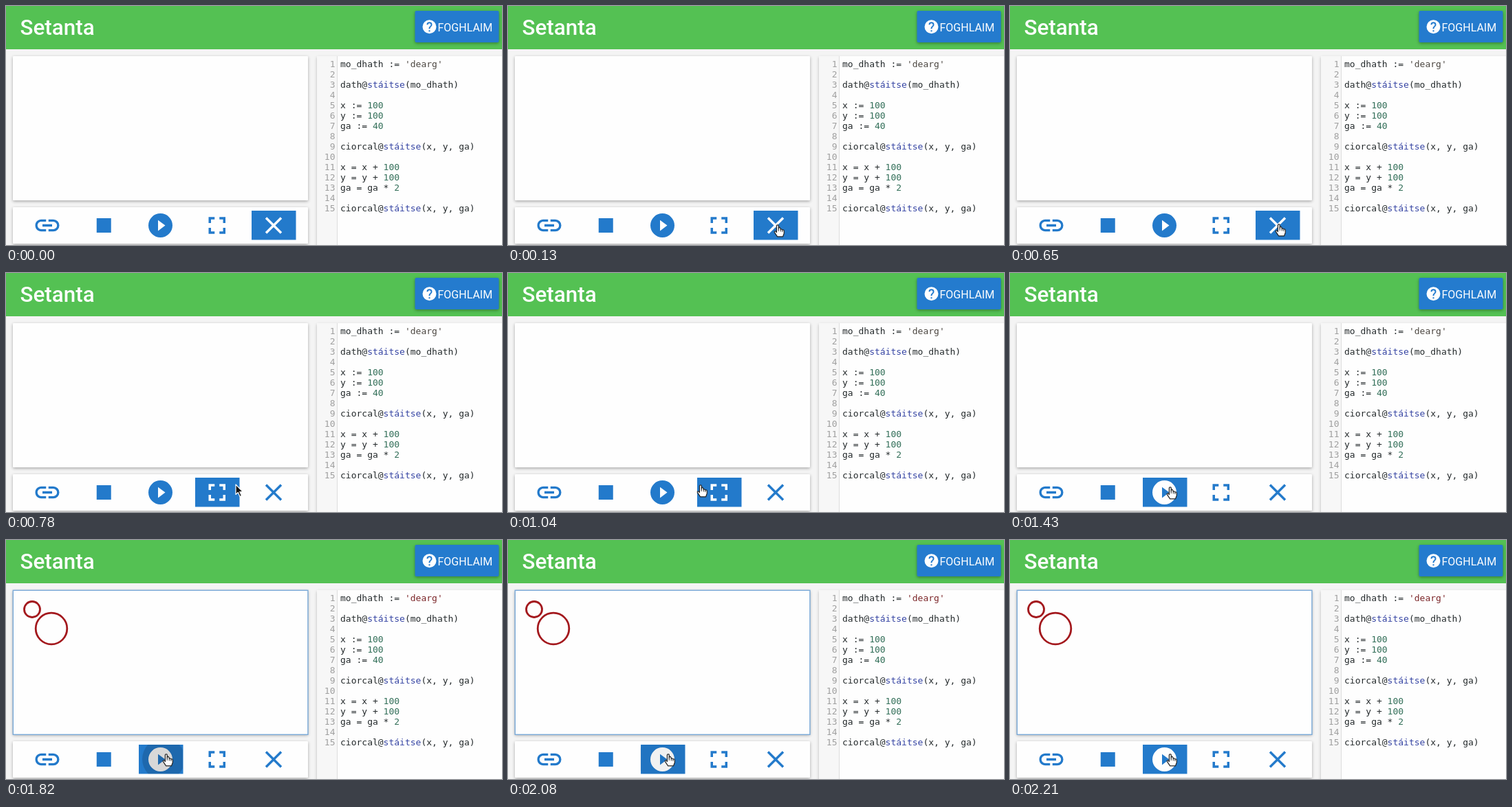
These frames come from a looping animation (721 by 348 pixels, 3.12 s). An HTML page with a canvas:

```html
<!DOCTYPE html>
<html lang="ga">
<head>
<meta charset="utf-8">
<title>Setanta</title>
<style>
  html, body { margin: 0; width: 721px; height: 348px; overflow: hidden; }
  canvas { display: block; }
</style>
</head>
<body>
<canvas id="stage" width="721" height="348"></canvas>
<script>
const ctx = document.getElementById('stage').getContext('2d');
const LOOP = 3120;
const BLUE = '#237acb', WHITE = '#fefefe';

const code = [
  "mo_dhath := 'dearg'", '', 'dath@stáitse(mo_dhath)', '',
  'x := 100', 'y := 100', 'ga := 40', '',
  'ciorcal@stáitse(x, y, ga)', '',
  'x = x + 100', 'y = y + 100', 'ga = ga * 2', '',
  'ciorcal@stáitse(x, y, ga)'
];

const icons = {
  link: 'M3.9 12c0-1.71 1.39-3.1 3.1-3.1h4V7H7c-2.76 0-5 2.24-5 5s2.24 5 5 5h4v-1.9H7c-1.71 0-3.1-1.39-3.1-3.1zM8 13h8v-2H8zM17 7h-4v1.9h4a3.1 3.1 0 0 1 0 6.2h-4V17h4a5 5 0 0 0 0-10z',
  stop: 'M6 6h12v12H6z',
  play: 'M12 2a10 10 0 1 0 0 20a10 10 0 1 0 0-20zM10 16.5v-9l6 4.5z',
  full: 'M7 14H5v5h5v-2H7zM5 10h2V7h3V5H5zM17 17h-3v2h5v-5h-2zM14 5v2h3v3h2V5z',
  close: 'M19 6.4L17.6 5 12 10.6 6.4 5 5 6.4 10.6 12 5 17.6 6.4 19 12 13.4 17.6 19 19 17.6 13.4 12z'
};
for (const name in icons) icons[name] = new Path2D(icons[name]);

const help = new Path2D('M12 2a10 10 0 1 0 0 20a10 10 0 1 0 0-20zM13 19h-2v-2h2zM15.07 11.25l-.9.92C13.45 12.9 13 13.5 13 15h-2v-.5c0-1.1.45-2.1 1.17-2.83l1.24-1.26c.37-.36.59-.86.59-1.41a2 2 0 0 0-4 0H8a4 4 0 0 1 8 0c0 .88-.36 1.68-.93 2.25z');
// Both pointers have their hot spot at the origin.
const arrow = new Path2D('M0 0V14.5L3.3 11.4L6 17.5L8.5 16.4L5.8 10.6H10.3Z');
const hand = new Path2D('M-1.6 1C-1.6-.6 1.2-.6 1.2 1V6C2-.1 4.2 5.1 4.3 6.6C5 5.5 6.8 5.9 6.9 7.3C7.8 6.5 9.3 7.1 9.3 8.5V12L7.6 16.8H-.4L-4.6 10.6C-5.3 9-3.6 8.2-2.6 9.4L-1.6 10.5Z');

// Pointer steps: time, x, y, hovered button, shape
const moves = [
  [0, 0, 0, 'close', null],
  [130, 392, 319, 'close', hand],
  [650, 391, 318, 'close', hand],
  [780, 334, 308, 'full', arrow],
  [910, 305, 309, 'full', hand],
  [1040, 280, 309, 'full', hand],
  [1170, 250, 311, 'play', hand],
  [1300, 236, 312, 'play', hand],
  [1430, 233, 312, 'play', hand]
];
// Press ripple: time, radius, opacity
const ripples = [
  [0, 0, 0], [1690, 16, 0.16], [1820, 31, 0.15],
  [1950, 40, 0.1], [2080, 40, 0.05], [2210, 0, 0]
];
const stepAt = (steps, t) => steps.filter(s => s[0] <= t).pop();

function rect(x, y, w, h, color) {
  ctx.fillStyle = color;
  ctx.fillRect(x, y, w, h);
}

function raised(x, y, w, h, color, radius, alpha) {
  ctx.save();
  ctx.shadowColor = `rgba(0,0,0,${alpha})`;
  ctx.shadowBlur = 4;
  ctx.shadowOffsetY = 1.5;
  ctx.fillStyle = color;
  ctx.beginPath();
  ctx.roundRect(x, y, w, h, radius);
  ctx.fill();
  ctx.restore();
}

function text(str, x, y, font, color, align = 'left') {
  ctx.font = font;
  ctx.fillStyle = color;
  ctx.textAlign = align;
  ctx.fillText(str, x, y);
}

function ring(x, y, r) {
  ctx.beginPath();
  ctx.arc(x, y, r, 0, Math.PI * 2);
  ctx.stroke();
}

function fillIcon(path, x, y, scale, color) {
  ctx.save();
  ctx.translate(x, y);
  ctx.scale(scale, scale);
  ctx.translate(-12, -12);
  ctx.fillStyle = color;
  ctx.fill(path, 'evenodd');
  ctx.restore();
}

function drawHeader() {
  rect(0, 0, 721, 63, '#54c153');
  text('Setanta', 20.5, 42, '500 31.4px Roboto, sans-serif', WHITE);
  raised(594.5, 7, 122, 46, '#247bce', 2, 0.35);
  fillIcon(help, 615.5, 30.3, 1, WHITE);
  text('FOGHLAIM', 627.5, 37, '16px Roboto, sans-serif', WHITE);
}

function drawCode(ran) {
  const font = '13px "DejaVu Sans Mono", monospace';
  raised(452, 73, 280, 290, WHITE, 0, 0.25);
  rect(452, 73, 29, 275, '#f7f7f7');
  rect(481, 73, 1, 275, '#dddddd');
  code.forEach((line, i) => {
    const y = 89 + i * 15;
    text(String(i + 1), 478.5, y, font, '#a0a0a0', 'right');
    let x = 486;
    for (const token of line.match(/'\w+'|stáitse|\b\d+|./gu) || []) {
      const color = token[0] === "'" ? (ran ? '#7b2528' : '#4b4640')
        : token === 'stáitse' ? '#3544a3'
        : /^\d/.test(token) ? '#34705a' : '#242a2c';
      text(token, x, y, font, color);
      x += ctx.measureText(token).width;
    }
  });
}

function drawOutput(ran) {
  raised(10, 73, 429, 210, WHITE, 1, 0.32);
  if (!ran) return;
  ctx.lineWidth = 1.4;
  ctx.strokeStyle = '#79a9d8';
  ctx.strokeRect(10.3, 73.3, 428.6, 210);
  ctx.lineWidth = 2.8;
  ctx.strokeStyle = '#a3181d';
  ring(38, 101, 11.5);
  ring(66, 129, 22.8);
}

function drawToolbar(hovered, t) {
  raised(10, 293, 429, 53, WHITE, 1, 0.32);
  Object.keys(icons).forEach((name, i) => {
    const x = 60 + i * 82.25, active = name === hovered;
    if (active) rect(Math.round(x - 32), 298, 64.5, 42.5, BLUE);
    fillIcon(icons[name], x, 319.5, 1.75, active ? WHITE : BLUE);
  });
  const [, radius, alpha] = stepAt(ripples, t);
  if (!alpha) return;
  ctx.save();
  ctx.beginPath();
  ctx.rect(192, 298, 65, 42.5);
  ctx.clip();
  ctx.fillStyle = `rgba(0,0,0,${alpha})`;
  ctx.beginPath();
  ctx.arc(229, 319, radius, 0, Math.PI * 2);
  ctx.fill();
  ctx.restore();
}

function drawPointer(x, y, shape) {
  if (!shape) return;
  const isArrow = shape === arrow;
  ctx.save();
  ctx.translate(x, y);
  ctx.lineWidth = 1.2;
  ctx.lineJoin = 'round';
  ctx.fillStyle = isArrow ? '#111' : WHITE;
  ctx.strokeStyle = isArrow ? WHITE : '#222';
  ctx.fill(shape);
  ctx.stroke(shape);
  if (!isArrow) {
    ctx.lineWidth = 0.9;
    ctx.stroke(new Path2D('M1.2 6V9M4.3 7V9.5M6.9 7.5V10'));
  }
  ctx.restore();
}

function draw(t) {
  const ran = t >= 1690;
  const [, x, y, hovered, shape] = stepAt(moves, t);
  rect(0, 0, 721, 348, '#f4f4f4');
  drawHeader();
  drawOutput(ran);
  drawToolbar(hovered, t);
  drawCode(ran);
  drawPointer(x, y, shape);
}

const start = performance.now();
function tick() {
  draw((performance.now() - start) % LOOP);
  requestAnimationFrame(tick);
}
tick();
</script>
</body>
</html>
```
